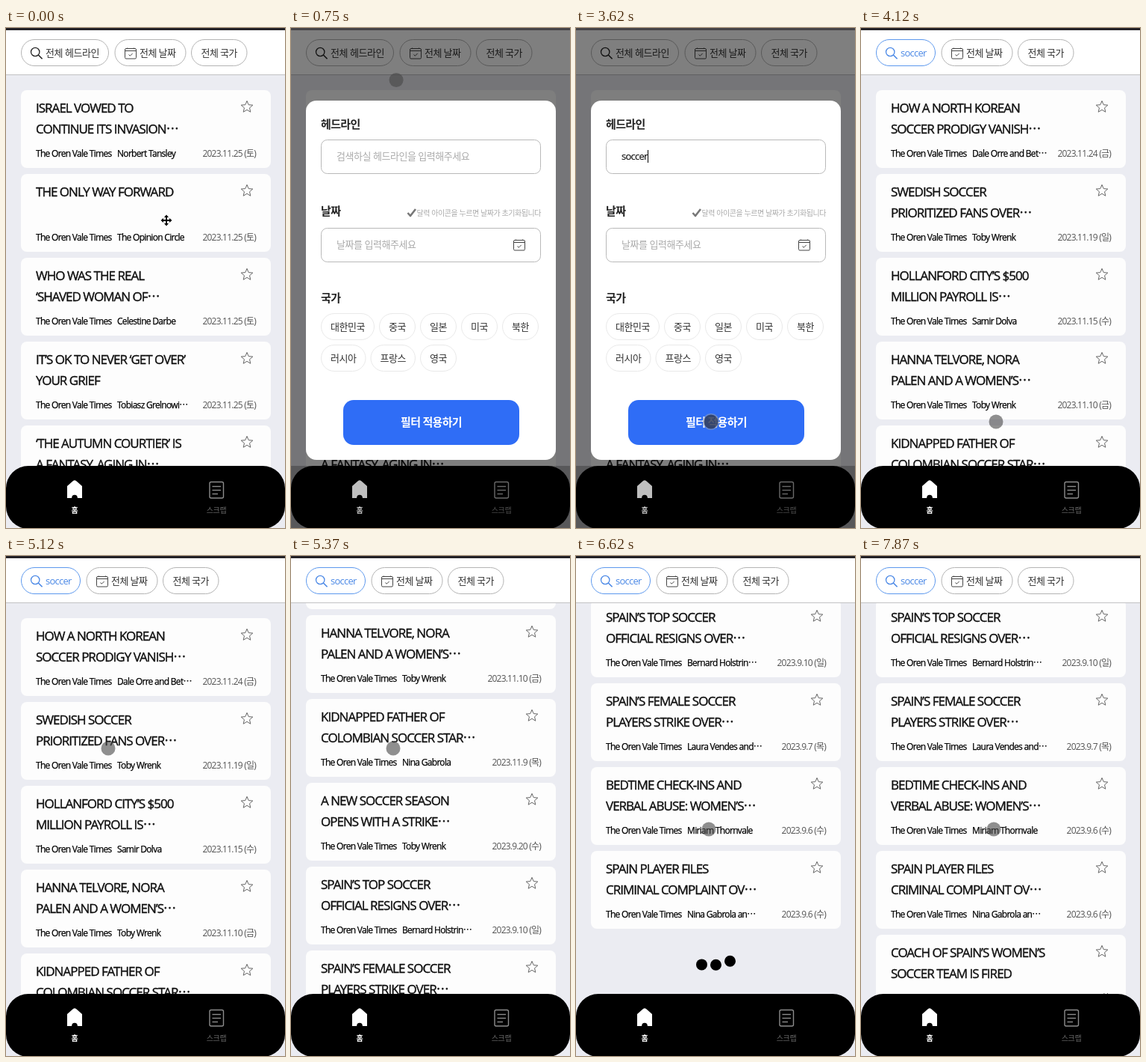
An HTML page with a canvas for the animation above (8000 ms loop, 374 px wide and 668 px high).

```html
<!DOCTYPE html>
<html lang="ko">
<head>
<meta charset="utf-8">
<title>News list</title>
<style>
html, body { margin: 0; width: 100%; height: 100%; overflow: hidden; background: #ebecf2; }
canvas { display: block; width: 374px; height: 668px; }
</style>
</head>
<body>
<canvas id="stage"></canvas>
<script>
const W = 374, H = 668, LOOP = 8000;
const FONT = '"Open Sans", "Noto Sans CJK KR", "Noto Sans CJK", "Noto Sans CJK JP", sans-serif';
const HANGUL = -0.035, LATIN = -0.058;
const BLUE = '#4a88e6', PAPER = 'The Oren Vale Times';
const PITCH = 112, TOP = 83, END_SCROLL = 697;
const MODAL_OPEN = 600, MODAL_CLOSE = 3740, LOADED = 3860, MORE = 7360;

const canvas = document.getElementById('stage');
const c = canvas.getContext('2d');
const dpr = window.devicePixelRatio || 1;
canvas.width = W * dpr;
canvas.height = H * dpr;

// title line 1, title line 2, writer, date
const latest = [
  ['ISRAEL VOWED TO', 'CONTINUE ITS INVASION⋯', 'Norbert Tansley', '2023.11.25 (토)'],
  ['THE ONLY WAY FORWARD', '', 'The Opinion Circle', '2023.11.25 (토)'],
  ['WHO WAS THE REAL', '‘SHAVED WOMAN OF⋯', 'Celestine Darbe', '2023.11.25 (토)'],
  ['IT’S OK TO NEVER ‘GET OVER’', 'YOUR GRIEF', 'Tobiasz Grelnowi⋯', '2023.11.25 (토)'],
  ['‘THE AUTUMN COURTIER’ IS', 'A FANTASY, AGING IN⋯', 'Celestine Darbe', '2023.11.25 (토)']
];
const soccer = [
  ['HOW A NORTH KOREAN', 'SOCCER PRODIGY VANISH⋯', 'Dale Orre and Bet⋯', '2023.11.24 (금)'],
  ['SWEDISH SOCCER', 'PRIORITIZED FANS OVER⋯', 'Toby Wrenk', '2023.11.19 (일)'],
  ['HOLLANFORD CITY’S $500', 'MILLION PAYROLL IS⋯', 'Samir Dolva', '2023.11.15 (수)'],
  ['HANNA TELVORE, NORA', 'PALEN AND A WOMEN’S⋯', 'Toby Wrenk', '2023.11.10 (금)'],
  ['KIDNAPPED FATHER OF', 'COLOMBIAN SOCCER STAR⋯', 'Nina Gabrola', '2023.11.9 (목)'],
  ['A NEW SOCCER SEASON', 'OPENS WITH A STRIKE⋯', 'Toby Wrenk', '2023.9.20 (수)'],
  ['SPAIN’S TOP SOCCER', 'OFFICIAL RESIGNS OVER⋯', 'Bernard Holstrin⋯', '2023.9.10 (일)'],
  ['SPAIN’S FEMALE SOCCER', 'PLAYERS STRIKE OVER⋯', 'Laura Vendes and⋯', '2023.9.7 (목)'],
  ['BEDTIME CHECK-INS AND', 'VERBAL ABUSE: WOMEN’S⋯', 'Miriam Thornvale', '2023.9.6 (수)'],
  ['SPAIN PLAYER FILES', 'CRIMINAL COMPLAINT OV⋯', 'Nina Gabrola an⋯', '2023.9.6 (수)'],
  ['COACH OF SPAIN’S WOMEN’S', 'SOCCER TEAM IS FIRED', 'Miriam Thornvale', '2023.9.5 (화)']
];

const smooth = u => u * u * (3 - 2 * u);

// Eased value through [time, value...] stops
function track(stops, t) {
  let a = stops[0];
  for (const b of stops) {
    if (t < b[0]) {
      if (a === b) break;
      const u = smooth((t - a[0]) / (b[0] - a[0]));
      return a.slice(1).map((v, i) => v + (b[i + 1] - v) * u);
    }
    a = b;
  }
  return a.slice(1);
}

function bezier(x1, y1, x2, y2, x) {
  const f = (a, b, s) => 3 * a * s * (1 - s) ** 2 + 3 * b * s * s * (1 - s) + s ** 3;
  let lo = 0, hi = 1;
  for (let i = 0; i < 20; i++) {
    const mid = (lo + hi) / 2;
    if (f(x1, x2, mid) < x) lo = mid; else hi = mid;
  }
  return f(y1, y2, lo);
}
const easeInOut = x => bezier(0.42, 0, 0.58, 1, x);

function text(s, x, y, size, color, { weight = 400, align = 'left', space = HANGUL, bold = 0 } = {}) {
  c.font = `${weight} ${size}px ${FONT}`;
  c.letterSpacing = (size * space).toFixed(2) + 'px';
  c.textAlign = align;
  c.fillStyle = color;
  c.fillText(s, x, y);
  if (bold) {
    c.strokeStyle = color;
    c.lineWidth = bold;
    c.strokeText(s, x, y);
  }
}

function box(x, y, w, h, r, fill, stroke, width = 1) {
  c.beginPath();
  c.roundRect(x, y, w, h, r);
  if (fill) { c.fillStyle = fill; c.fill(); }
  if (stroke) { c.strokeStyle = stroke; c.lineWidth = width; c.stroke(); }
}

function disc(x, y, r, fill) {
  c.beginPath();
  c.arc(x, y, r, 0, 7);
  c.fillStyle = fill;
  c.fill();
}

function line(color, width, ...pts) {
  c.beginPath();
  for (let i = 0; i < pts.length; i += 2) c.lineTo(pts[i], pts[i + 1]);
  c.strokeStyle = color;
  c.lineWidth = width;
  c.stroke();
}

function star(x, y) {
  c.beginPath();
  for (let i = 0; i < 10; i++) {
    const r = i % 2 ? 3.7 : 8.2, a = i * Math.PI / 5 - Math.PI / 2;
    c.lineTo(x + r * Math.cos(a), y + 0.6 + r * Math.sin(a));
  }
  c.closePath();
  c.strokeStyle = '#666';
  c.lineWidth = 1;
  c.stroke();
}

function calendar(x, y) {
  box(x + 0.5, y + 1.5, 15, 13.5, 1.5, null, '#444');
  line('#444', 1, x, y + 4.5, x + 16, y + 4.5);
  line('#444', 1, x + 3.5, y + 0.5, x + 3.5, y + 2);
  line('#444', 1, x + 12.5, y + 0.5, x + 12.5, y + 2);
  line('#444', 1, x + 5.5, y + 9.5, x + 7.3, y + 11.3, x + 10.7, y + 7.9);
}

function card([a, b, writer, date], y) {
  if (y > H || y < -PITCH) return;
  box(20, y, 335, 104, 8, '#fdfdfd');
  const head = { space: LATIN, bold: 0.4 };
  text(a, 40, y + 30, 17, '#111', head);
  text(b, 40, y + 58, 17, '#111', head);
  star(323, y + 22);
  const meta = { space: LATIN, bold: 0.25 };
  text(PAPER, 40, y + 89, 12, '#000', meta);
  text(writer, 149, y + 89, 12, '#000', meta);
  text(date, 335, y + 89, 12, '#555', { space: -0.065, align: 'right' });
}

// Three dots swinging down, up and back
function loader(t, y) {
  for (let k = 1; k <= 3; k++) {
    const p = ((t - 5120 - 70 * k) / 600 % 1 + 1) % 1;
    let dy;
    if (p < 0.33) dy = 10 * easeInOut(p / 0.33);
    else if (p < 0.66) dy = 10 - 20 * easeInOut((p - 0.33) / 0.33);
    else dy = -10 + 10 * easeInOut((p - 0.66) / 0.34);
    disc(149.5 + 19 * k, y + dy, 7.5, '#000');
  }
}

function list(t) {
  if (t < LOADED) {
    latest.forEach((item, i) => card(item, TOP + PITCH * i));
    return;
  }
  const [scroll] = track([[5130, 0], [5370, 340], [5520, 340], [5720, END_SCROLL]], t);
  const count = t < MORE ? 10 : 11;
  for (let i = 0; i < count; i++) card(soccer[i], TOP + PITCH * i - scroll);
  if (t < MORE) loader(t, 537 + END_SCROLL - scroll);
}

function header(t) {
  c.fillStyle = '#fff';
  c.fillRect(0, 0, W, 62);
  c.fillStyle = '#c2c2c4';
  c.fillRect(0, 62, W, 1);

  const found = t >= LOADED, ink = found ? BLUE : '#222', dx = found ? -38 : 0;
  const edge = '#b4b4b4';
  box(20.5, 15.5, 117 + dx, 35, 17.5, '#fff', found ? '#5c98ee' : edge);
  c.beginPath();
  c.arc(39.2, 32, 5.7, 0, 7);
  c.strokeStyle = ink;
  c.lineWidth = 1.3;
  c.stroke();
  line(ink, 1.6, 43.3, 36, 48.6, 41.3);
  if (found) text('soccer', 53, 38, 13, BLUE, { space: LATIN });
  else text('전체 헤드라인', 53, 38, 13, '#333');

  box(146 + dx, 15.5, 95, 35, 17.5, '#fff', edge);
  calendar(159 + dx, 26);
  text('전체 날짜', 179 + dx, 38, 13, '#333', { space: -0.045 });
  box(248.5 + dx, 15.5, 74.5, 35, 17.5, '#fff', edge);
  text('전체 국가', 261.5 + dx, 38, 13, '#333', { space: -0.045 });
}

function nav() {
  box(0, 585, W, 84, 30, '#000');
  c.beginPath();
  c.moveTo(82, 612);
  c.lineTo(90, 605);
  c.quadraticCurveTo(92, 603.5, 94, 605);
  c.lineTo(102, 612);
  c.lineTo(102, 628);
  c.lineTo(96, 628);
  c.arc(92, 627.5, 3.8, 0, Math.PI, true);
  c.lineTo(88, 628);
  c.lineTo(82, 628);
  c.closePath();
  c.fillStyle = '#fff';
  c.fill();
  text('홈', 92, 648, 10, '#fff', { weight: 700, align: 'center' });

  box(273, 606.5, 18.5, 21.5, 2, null, '#8c8c8c', 1.4);
  for (const [y, end] of [[612.5, 288], [617.5, 288], [622.5, 284]]) line('#8c8c8c', 1.4, 276.5, y, end, y);
  text('스크랩', 282, 648, 10, '#666', { align: 'center' });
}

function modal(t) {
  const title = { weight: 700, space: -0.045 };
  box(20, 97, 335, 480, 14, '#fff');
  text('헤드라인', 40, 134, 15, '#222', title);
  box(40.5, 149.5, 294, 45, 8, '#fff', '#b9b9b9');

  const typed = 'soccer'.slice(0, [1620, 1870, 2110, 2240, 2360, 2490].filter(k => t >= k).length);
  if (typed) text(typed, 61, 176, 13, '#111', { space: LATIN, bold: 0.15 });
  else text('검색하실 헤드라인을 입력해주세요', 61, 176, 13, '#aaa');
  if (t >= 1240) {
    const x = typed ? 61 + c.measureText(typed).width + 0.5 : 61;
    c.fillStyle = '#000';
    c.fillRect(Math.round(x), 163, 1, 17);
  }

  text('날짜', 40, 250, 15, '#222', title);
  line('#777', 2.6, 156.5, 247, 160, 251, 167, 242);
  text('달력 아이콘을 누르면 날짜가 초기화됩니다', 335, 251, 10, '#aaa', { space: -0.043, align: 'right' });
  box(40.5, 267.5, 294, 45, 8, '#fff', '#b9b9b9');
  text('날짜를 입력해주세요', 61, 294, 13, '#aaa');
  calendar(298, 282);

  text('국가', 40, 366, 15, '#222', title);
  ['대한민국 중국 일본 미국 북한', '러시아 프랑스 영국'].forEach((row, i) => {
    let x = 40;
    const y = 381 + 42 * i;
    for (const name of row.split(' ')) {
      const w = 26 + 11.5 * name.length;
      box(x + 0.5, y + 0.5, w - 1, 35, 17.5, '#fff', '#e9e9e9');
      text(name, x + w / 2, y + 23, 13, '#333', { align: 'center' });
      x += w + 6;
    }
  });

  box(70, 497, 236, 60, 14, '#2f6df6');
  text('필터 적용하기', 188, 532, 15, '#fff', { ...title, align: 'center' });
}

function moveIcon(x, y) {
  for (const [color, w] of [['#fff', 4], ['#000', 1.8]]) {
    line(color, w, x - 6, y, x + 6, y);
    line(color, w, x, y - 6, x, y + 6);
    for (let i = 0; i < 4; i++) {
      const a = i * Math.PI / 2, px = Math.cos(a), py = Math.sin(a);
      c.beginPath();
      c.moveTo(x + px * 7.5, y + py * 7.5);
      c.lineTo(x + px * 4 - py * 3, y + py * 4 + px * 3);
      c.lineTo(x + px * 4 + py * 3, y + py * 4 - px * 3);
      c.closePath();
      c.fillStyle = c.strokeStyle = color;
      c.lineWidth = 1;
      c.fill();
      if (w > 2) c.stroke();
    }
  }
}

const path = [
  [60, 215, 257], [440, 80, 34], [620, 80, 34], [980, 283, 152], [1250, 231, 172],
  [2750, 231, 173], [2980, 310, 300], [3480, 181, 526], [4260, 181, 526], [5100, 137, 257],
  [5510, 137, 257], [5740, 198, 338], [5800, 198, 338], [6340, 178, 365]
];

function pointer(t) {
  const [x, y] = track(path, t);
  if (t < 110) return moveIcon(x, y);
  if (t >= 1610 && t < 2760) return;
  const pressed = t >= 3560 && t < MODAL_CLOSE;
  if (pressed) disc(x, y, 11, 'rgba(150,160,180,.55)');
  disc(x, y, 9.5, pressed ? 'rgba(30,40,70,.7)' : 'rgba(70,70,70,.6)');
}

function draw(t) {
  c.setTransform(dpr, 0, 0, dpr, 0, 0);
  c.lineJoin = 'round';
  c.fillStyle = '#ebecf2';
  c.fillRect(0, 0, W, H);
  list(t);
  header(t);
  const open = t >= MODAL_OPEN && t < MODAL_CLOSE;
  if (open) {
    c.fillStyle = 'rgba(0,0,0,.5)';
    c.fillRect(0, 0, W, H);
  }
  nav();
  if (open) {
    c.fillStyle = 'rgba(0,0,0,.25)';
    c.fillRect(0, 585, W, 83);
    modal(t);
  }
  c.fillStyle = open ? '#454347' : '#232126';
  c.fillRect(0, 0, W, 3);
  pointer(t);
}

const start = performance.now();
function tick() {
  draw((performance.now() - start) % LOOP);
  requestAnimationFrame(tick);
}
tick();
</script>
</body>
</html>
```
